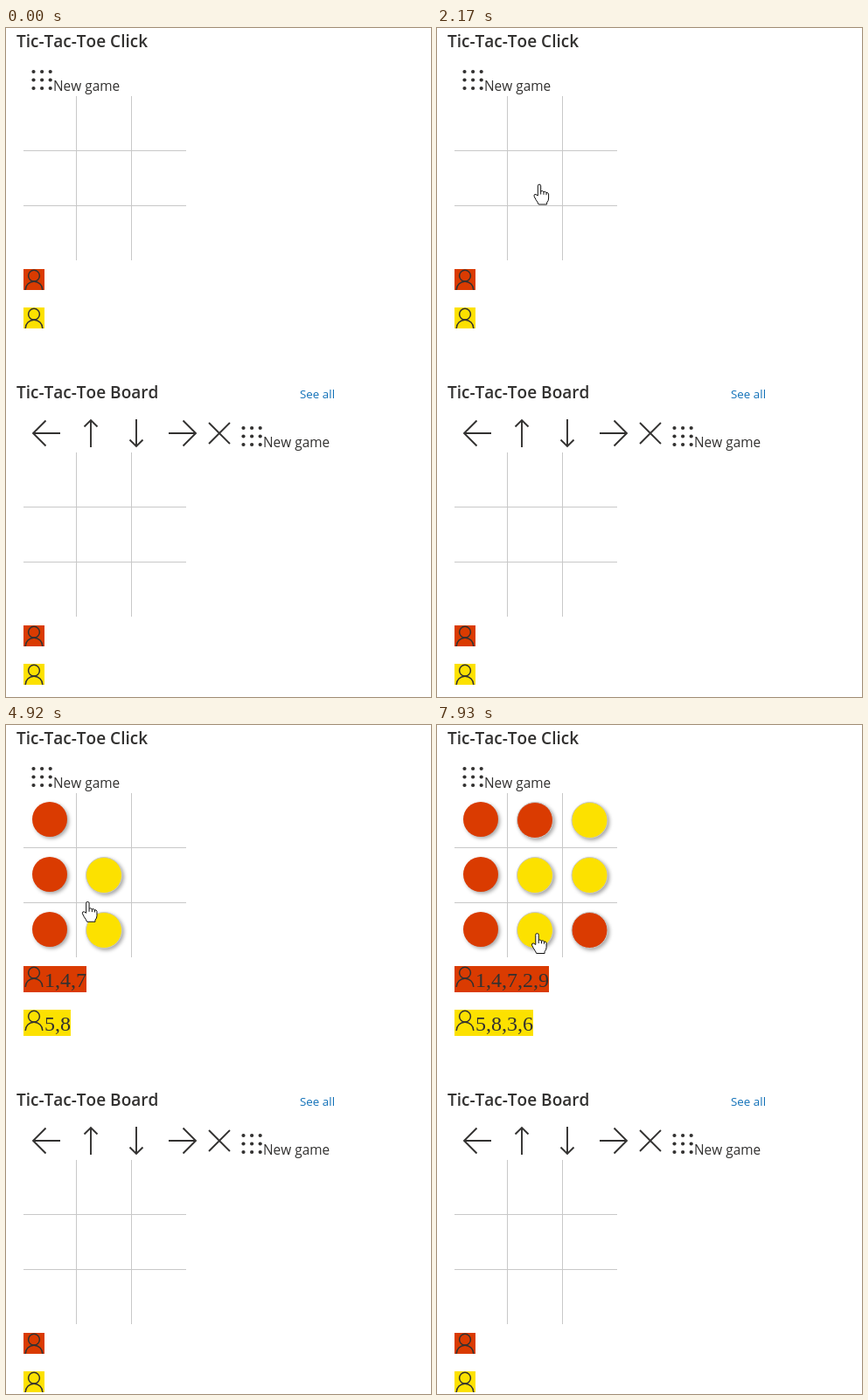
An HTML page for the animation above (8 s loop, 486 px wide and 766 px high).

```html
<!DOCTYPE html>
<html lang="en">
<head>
<meta charset="utf-8">
<title>Tic-Tac-Toe</title>
<style>
html, body { margin: 0; width: 100%; height: 100%; overflow: hidden; background: #fff; }
svg { display: block; }
text { font-family: "Open Sans", "Noto Sans", sans-serif; fill: #323130; font-kerning: none; white-space: pre; }
.title { font-size: 19px; font-weight: 600; }
.label { font-size: 15.4px; }
.link { font-size: 13.4px; fill: #1070b8; }
.score { font-family: "Liberation Serif", "Times New Roman", serif; font-size: 24px; }
.icon { fill: none; stroke: #323130; stroke-width: 1.5; }
.tool { fill: none; stroke: #323130; stroke-width: 1.9; }
.grid { fill: none; stroke: #c8c8c8; stroke-width: 1; shape-rendering: crispEdges; }
.disc { filter: drop-shadow(2px 2px 2px rgba(0, 0, 0, .35)); }
.pointer { fill: #fff; stroke: #111; stroke-linejoin: round; }
</style>
</head>
<body>
<svg id="stage" width="486" height="766" viewBox="0 0 486 766"></svg>
<script>
const LOOP = 8000, TICK = 70, ENTER = 240, GLOW = 140;
const RED = '#da3b01', YELLOW = '#fce100';

// where the pointer rests: x, y, arrival and, on a turn, the click
const stops = [
  { x: 93, y: 63, at: 1000 },
  { x: 38, y: 96, at: 1280 },
  { x: 54.5, y: 103.5, at: 1490, click: 1760 },
  { x: 117, y: 179, at: 2170, click: 2320 },
  { x: 43.5, y: 179.5, at: 2810, click: 3210 },
  { x: 105, y: 237, at: 3630, click: 3750 },
  { x: 62, y: 239, at: 4380, click: 4580 },
  { x: 168, y: 115, at: 5260, click: 5520 },
  { x: 106.5, y: 114.5, at: 5870, click: 6150 },
  { x: 174, y: 178, at: 6490, click: 6890 },
  { x: 170, y: 239, at: 7240, click: 7440 },
  { x: 114.5, y: 238.5, at: 7930 }
];

// a longer way takes more time
let last = { x: 486, y: 766 };
for (const s of stops) {
  s.from = last;
  s.leave = s.at - Math.min(180 + Math.hypot(s.x - last.x, s.y - last.y), 760);
  last = s;
}

// players alternate; the first two discs show up late
const turns = stops.filter(s => s.click).map((s, i) => ({
  ...s,
  player: i % 2,
  col: Math.floor((s.x - 18) / 63),
  row: Math.floor((s.y - 78) / 63),
  shown: s.click + (i < 2 ? 630 : 300)
}));

const stage = document.getElementById('stage');
const $ = id => document.getElementById(id);
const show = (id, on) => $(id).style.display = on ? '' : 'none';
const place = (id, x, y) => $(id).setAttribute('transform', `translate(${x} ${y})`);

const text = (cls, x, y, s) => `<text class="${cls}" x="${x}" y="${y}">${s}</text>`;

function newGame(x, y) {
  let dots = '';
  for (let i = 0; i < 9; i++)
    dots += `<circle cx="${x + 2.5 + i % 3 * 9.6}" cy="${y + 2.5 + (i / 3 | 0) * 9.5}" r="2.1" fill="#323130"/>`;
  return dots + text('label', x + 25, y + 24.5, 'New game');
}

const grid = y => `<path class="grid" d="M80.5 ${y}v188M143.5 ${y}v188M20 ${y + 62.5}h186M20 ${y + 125.5}h186"/>`;

const arrow = (x, y, turn, head) => `<path class="tool" transform="translate(${x} ${y}) rotate(${turn})"
  d="M0 0H31M${head} ${-head}L0 0L${head} ${head}"/>`;

const player = (id, y, color) => `<g id="${id}" transform="translate(20 ${y})">
  <rect width="24" height="24" fill="${color}"/>
  <circle class="icon" cx="12" cy="7.7" r="6.4"/>
  <path class="icon" d="M2.2 24a9.8 9.8 0 0 1 19.6 0"/>
  ${text('score', 24, 24, '')}</g>`;

// discs outside the first column have a thin rim
function disc({ col, row, player }, i) {
  const rim = col ? .5 : 0;
  return `<circle id="disc${i}" class="disc" cx="${50 + col * 62.5 - rim}" cy="${108 + row * 63 + 2 * rim}"
    r="${20 + rim}" fill="${player ? YELLOW : RED}" stroke="${rim ? '#c8c8c8' : 'none'}"/>`;
}

stage.innerHTML = `
  ${text('title', 12, 22, 'Tic-Tac-Toe Click')}${newGame(29, 47.5)}${grid(78)}
  ${turns.map(disc).join('')}
  ${player('red', 276, RED)}${player('yellow', 320, YELLOW)}
  <g id="lower">
    ${text('title', 12, 424, 'Tic-Tac-Toe Board')}${text('link', 336, 424, 'See all')}
    ${arrow(31, 464, 0, 14.5)}${arrow(97, 449, 90, 7.5)}${arrow(149, 479, -90, 7.5)}${arrow(217, 464, 180, 14.5)}
    <path class="tool" d="M232 452l24 24M256 452l-24 24"/>
    ${newGame(269, 455.5)}${grid(486)}${player('red2', 684, RED)}${player('yellow2', 728, YELLOW)}
  </g>
  <circle id="glow" r="12" fill="#ff0" opacity=".5"/>
  <g id="pointer" class="pointer">
    <path id="hand" d="M-1.7 13V1.8a1.7 1.7 0 0 1 3.4 0V8q1.7-1.4 3.3 .6q1.8-1 3 .9q2-.5 2.6 1.5V16q0 3-2 5v2H-.8
      q-1.2-3-3.2-5.5L-6 13.500q-.3-2.400 2-2zM1.700 8v3.500M5 8.600v3.200M8 9.500v2.700"/>
    <path id="cursor" d="M0 0V16l3.800-3.600 2.500 5.800 2.500-1.100-2.500-5.700H11.500z"/>
  </g>`;

// the pointer moves in whole ticks and slows down towards its stop
function pointerAt(t) {
  const s = stops.filter(s => t >= s.leave).pop() || stops[0];
  const steps = Math.floor((s.at - s.leave) / TICK) + 1;
  const p = Math.max(0, Math.min(1, (Math.floor((t - s.leave) / TICK) + 1) / steps));
  const e = p * (1.6 - .6 * p);
  return [s.from.x + (s.x - s.from.x) * e, s.from.y + (s.y - s.from.y) * e];
}

function setScore(id, done) {
  const n = done.length, rect = $(id).querySelector('rect');
  rect.setAttribute('width', n ? 18 + 18 * n : 24);
  rect.setAttribute('height', n ? 30 : 24);
  $(id).querySelector('text').textContent = done.map(d => d.row * 3 + d.col + 1).join(',');
}

function draw(t) {
  const done = turns.filter(d => t >= d.shown);
  turns.forEach((d, i) => show('disc' + i, t >= d.shown));
  ['red', 'yellow'].forEach((id, k) => setScore(id, done.filter(d => d.player === k)));
  place('yellow', 20, done.length ? 326 : 320);
  place('lower', 0, Math.min(done.length, 2) * 6);

  const [x, y] = pointerAt(t), over = x < 206 && y > 45 && y < 266;
  show('pointer', t >= ENTER);
  place('pointer', x, y);
  show('hand', over);
  show('cursor', !over);

  const hit = turns.find(d => t >= d.click && t < d.click + GLOW);
  show('glow', hit);
  if (hit) place('glow', hit.x, hit.y);
}

const start = performance.now();
function frame() {
  draw((performance.now() - start) % LOOP);
  requestAnimationFrame(frame);
}
frame();
</script>
</body>
</html>
```
